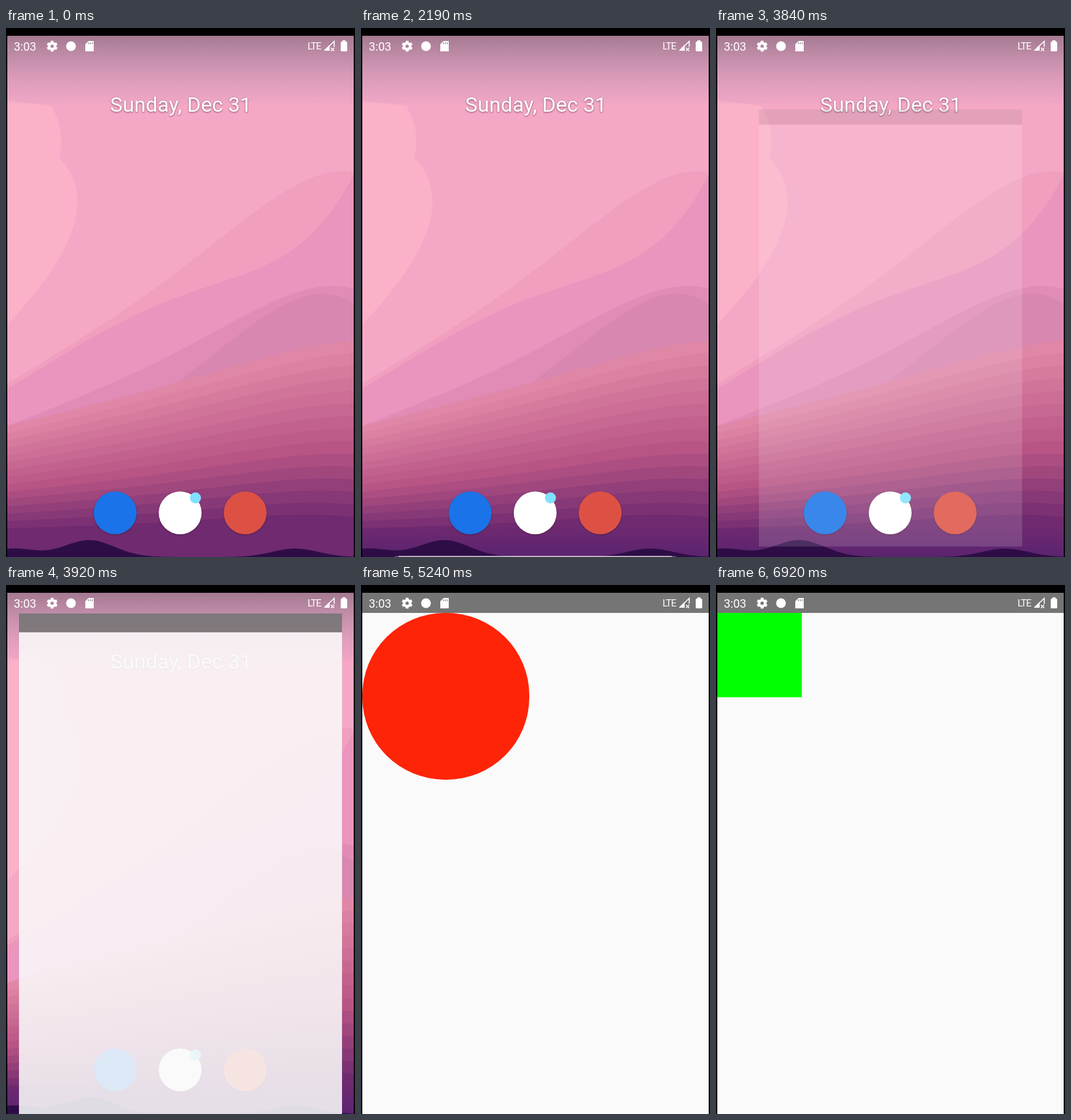
Write an HTML page with a canvas that moves like this. It is 537 px wide and 815 px high and loops after 9.43 s.

```html
<!DOCTYPE html>
<html lang="en">
<head>
<meta charset="utf-8">
<title>Shape transition on a phone</title>
<style>
html, body { margin: 0; width: 100%; height: 100%; overflow: hidden; background: #000; }
canvas { display: block; }
#shape { position: absolute; left: 2px; top: 43px; }
</style>
</head>
<body>
<canvas id="stage" width="537" height="815"></canvas>
<div id="shape"></div>
<script>
const ctx = document.getElementById('stage').getContext('2d');
const shapeStyle = document.getElementById('shape').style;
const LOOP = 9430;
const SCREEN = { x: 2, y: 12, w: 533, h: 886 };
const STATUS_H = 31;
const BANDS = 15;
const clamp = v => Math.min(1, Math.max(0, v));
const mix = (a, b, f) => a + (b - a) * f;
const mixColor = (a, b, f) => `rgb(${a.map((v, i) => Math.round(mix(v, b[i], f)))})`;

function fill(color, draw) {
  ctx.fillStyle = color;
  ctx.beginPath();
  draw();
  ctx.fill();
}
const disc = (x, y, r, color) => fill(color, () => ctx.arc(x, y, r, 0, 7));

function fade(y0, y1, from, to) {
  const g = ctx.createLinearGradient(0, y0, 0, y1);
  g.addColorStop(0, from);
  g.addColorStop(1, to);
  ctx.fillStyle = g;
  ctx.fillRect(2, y0, 533, y1 - y0);
}

// Fills everything below the line y = edge(x).
function below(color, edge) {
  fill(color, () => {
    ctx.moveTo(2, 815);
    for (let x = 2; x <= 538; x += 4) ctx.lineTo(x, edge(x));
    ctx.lineTo(538, 815);
  });
}

// A slope across the screen that swells (bulge > 0: downwards) on its right part.
function slope(color, left, right, bulge) {
  below(color, x => {
    const u = (x - 2) / 533;
    return mix(left, right, u) + bulge * 12.2 * u ** 4 * (1 - u);
  });
}

const bump = (x, center, width, height) => height * Math.exp(-(((x - center) / width) ** 2));

function bandColor(f) {
  const rose = [224, 135, 167], plum = [184, 85, 133], violet = [111, 42, 112];
  return f < 0.57 ? mixColor(rose, plum, f / 0.57) : mixColor(plum, violet, (f - 0.57) / 0.43);
}

function wallpaper(t) {
  ctx.fillStyle = '#f5a8c6';
  ctx.fillRect(2, 12, 533, 803);
  ctx.fillStyle = '#fbb1c7';
  ctx.fill(new Path2D('M2 112 L70 120 Q92 160 82 200 Q165 285 2 457'));
  slope('#f09fbf', 548, 222, -35);
  slope('#e995bd', 556, 226, 58);
  slope('#e08cb7', 613, 402, -30);
  slope('#d887b0', 700, 426, -55);
  for (let i = 0; i < BANDS; i++) {
    const f = i / (BANDS - 1);
    slope(bandColor(f), mix(613, 771, f), mix(481, 754, f), -7);
  }
  if (t >= 50) fade(767, 815, 'rgba(60,25,110,0)', 'rgba(60,25,110,.4)');
  below('#2e0d47', x => 815 - bump(x, 128, 55, 26) - bump(x, 10, 50, 13) - bump(x, 445, 50, 13));
  fade(12, 116, 'rgba(82,76,92,.5)', 'rgba(150,130,170,.06)');
}

function home(t) {
  wallpaper(t);
  ctx.save();
  ctx.shadowColor = 'rgba(60,20,50,.6)';
  ctx.shadowBlur = 3;
  ctx.shadowOffsetY = 1;
  ctx.fillStyle = '#fff';
  ctx.font = '32px Roboto, sans-serif';
  ctx.letterSpacing = '0.15px';
  ctx.fillText('Sunday, Dec 31', 160.3, 129);
  disc(168, 747, 33, '#1a73e8');
  disc(268, 747, 33, '#fff');
  disc(368, 747, 33, '#dd5144');
  ctx.restore();
  disc(291.5, 724, 8.5, '#80e0ff');
}

// Translucent panel that peeks in from the bottom edge and leaves again.
function peek(t, start, end, left, right) {
  if (t <= start || t >= end) return;
  const y = 815 - 48 * Math.sin(Math.PI * (t - start) / (end - start));
  fill('rgba(235,225,240,.4)', () => ctx.roundRect(left, y, right - left, 80, 22));
  ctx.fillStyle = 'rgba(240,230,240,.8)';
  ctx.fillRect(left + 22, y, right - left - 44, 1.5);
}

function appWindow(t) {
  if (t < 3840) return;
  const age = t - 3840;
  const s = age >= 260 ? 1 : 1 - 0.24 * Math.exp(-age / 63);
  const w = SCREEN.w * s, h = SCREEN.h * s;
  const x = SCREEN.x + (SCREEN.w - w) / 2;
  const y = SCREEN.y + (SCREEN.h - h) / 2 + 30 * (1 - s);
  ctx.globalAlpha = clamp(0.14 + age * 0.0092);
  ctx.fillStyle = '#fafafa';
  ctx.fillRect(x, y + STATUS_H * s, w, h - STATUS_H * s);
  ctx.fillStyle = '#757575';
  ctx.fillRect(x, y, w, STATUS_H * s);
  ctx.globalAlpha = 1;
}

// Cubic bezier easing (.4, 0, .2, 1), solved by bisection.
function ease(x) {
  let lo = 0, hi = 1, u = x;
  for (let i = 0; i < 24; i++) {
    u = (lo + hi) / 2;
    const v = 1 - u;
    if (1.2 * u * v * v + 0.6 * u * u * v + u ** 3 < x) lo = u; else hi = u;
  }
  return u * u * (3 - 2 * u);
}

// Red circle turning into a green square while it shrinks.
function shape(t) {
  const k = (t - 4973) / 50;
  const f = t >= 6920 ? 1 : ease(clamp((t - 5060) / 2000));
  shapeStyle.opacity = t < 5000 ? 0 : clamp(1 - (1 + k) * Math.exp(-k));
  shapeStyle.width = shapeStyle.height = 260 - 130 * f + 'px';
  shapeStyle.borderRadius = 130 * (1 - f) + 'px';
  shapeStyle.background = `color-mix(in oklab, #0f0 ${100 * f}%, #f00)`;
}

function gear(x, y) {
  ctx.lineWidth = 4;
  ctx.beginPath();
  ctx.arc(x, y, 4.6, 0, 7);
  ctx.stroke();
  for (let i = 0; i < 6; i++) {
    ctx.save();
    ctx.translate(x, y);
    ctx.rotate(i * Math.PI / 3);
    ctx.fillRect(-2.2, -8.3, 4.4, 3.5);
    ctx.restore();
  }
}

function statusBar() {
  ctx.fillStyle = ctx.strokeStyle = '#fff';
  ctx.font = '18px Roboto, sans-serif';
  ctx.fillText('3:03', 12, 35);
  ctx.font = '15px Roboto, sans-serif';
  ctx.letterSpacing = '-1px';
  ctx.fillText('LTE', 464, 33);
  ctx.letterSpacing = '0px';
  gear(71, 28);
  disc(100, 28, 7.5, '#fff');

  // memory card
  ctx.fill(new Path2D('M127 20 H135 V36 H122 V25 Z'));
  ctx.fillStyle = '#999';
  for (let x = 126; x < 134; x += 3) ctx.fillRect(x, 22, 1.4, 3);
  ctx.fillStyle = '#fff';

  // signal strength with a small cross
  ctx.fill(new Path2D('M489 35 L498 26 V35 Z'));
  ctx.lineWidth = 1.5;
  ctx.stroke(new Path2D('M491 34 L505 20.5 V29 M500 30.5 l5 5 m0 -5 l-5 5'));

  // battery
  fill('#fff', () => ctx.roundRect(515, 21, 10, 15, 1.5));
  ctx.fillRect(517.5, 19, 5, 3);
}

function draw(t) {
  ctx.fillStyle = '#000';
  ctx.fillRect(0, 0, 537, 815);
  ctx.save();
  ctx.beginPath();
  ctx.rect(2, 12, 533, 803);
  ctx.clip();
  home(t);
  peek(t, 40, 690, 14, 522);
  peek(t, 2183, 2900, 36, 500);
  appWindow(t);
  statusBar();
  ctx.restore();
  shape(t);
}

let start;
function tick(now) {
  start ??= now;
  draw((now - start) % LOOP);
  requestAnimationFrame(tick);
}
requestAnimationFrame(tick);
</script>
</body>
</html>
```
